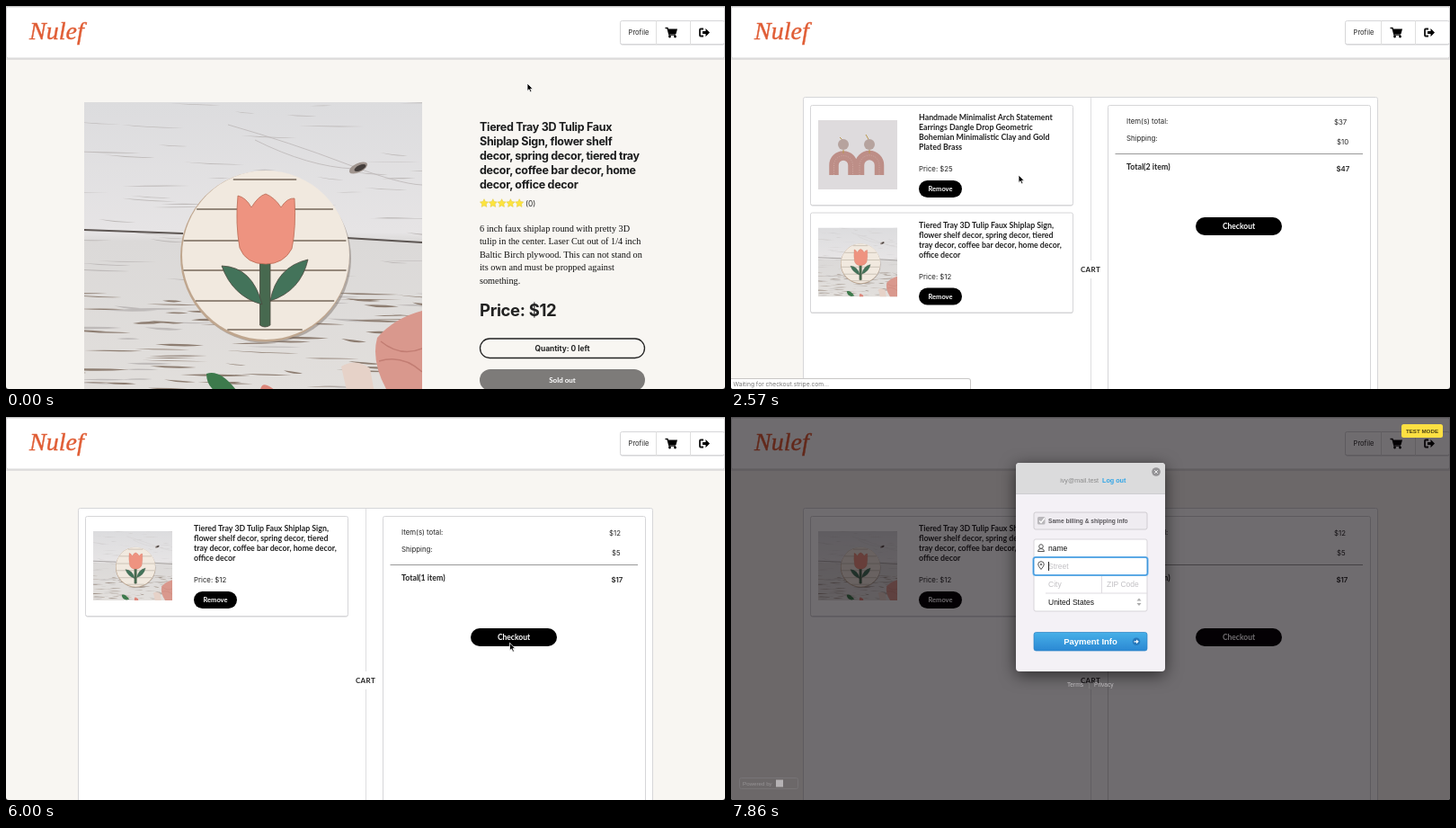
Write an HTML page that moves like this. It is 800 px wide and 426 px high and loops after 8000 ms.

```html
<!DOCTYPE html>
<html lang="en">
<head>
<meta charset="utf-8">
<title>Shop checkout</title>
<style>
html, body { margin: 0; width: 100%; height: 100%; overflow: hidden; background: #222; }
svg { display: block; }
#stage { width: 100%; height: 100%; border-radius: 0 0 3px 3px; }
text { white-space: pre; fill: #222; font: 7.8px Inter, sans-serif; }
.mid { text-anchor: middle; }
.end { text-anchor: end; }
.logo { font: italic 28px "Liberation Serif", serif; fill: #e05d35; stroke: #e05d35; stroke-width: .4px; }
.title { font: 700 12.5px Inter, sans-serif; letter-spacing: -.3px; fill: #1b1c1d; }
.price { font: 700 18.5px Inter, sans-serif; letter-spacing: -.35px; }
.serif { font: 10.25px "Liberation Serif", serif; fill: #111; }
.lato { font: 700 8.8px Lato, sans-serif; }
.pill { font: 700 7.5px Lato, sans-serif; fill: #fff; }
.strong { font-weight: 600; }
.status { font-size: 6.7px; fill: #777; }
.field { font: 8.5px "Liberation Sans", sans-serif; fill: #111; }
.hint { fill: #c3c1c5; }
.small { font: 7.2px "Liberation Sans", sans-serif; fill: #8b8b8b; }
.bold { font-weight: 700; }
.card { fill: #fff; stroke: #d6d6d8; }
</style>
</head>
<body>
<svg id="stage" viewBox="0 0 800 426" preserveAspectRatio="none"></svg>
<script>
const stage = document.getElementById('stage');
const $ = id => document.getElementById(id);

const lines = (x, y, step, cls, rows) =>
  rows.map((row, i) => `<text x="${x}" y="${y + i * step}" class="${cls}">${row}</text>`).join('');

const pill = (x, y, w, h, label, size = 7.5) => `
  <rect x="${x}" y="${y}" width="${w}" height="${h}" rx="${h / 2}"/>
  <text x="${x + w / 2}" y="${y + h / 2 + size * .34}" class="pill mid" style="font-size:${size}px">${label}</text>`;

const card = (x, y, w, h) => `
  <rect x="${x + .5}" y="${y + 1.5}" width="${w}" height="${h}" rx="2" fill="#d4d4d5"/>
  <rect x="${x + .5}" y="${y + .5}" width="${w}" height="${h}" rx="2" class="card"/>`;

function seeded(seed) {
  return () => (seed = (seed * 16807) % 2147483647) / 2147483647;
}

// Thin tapered slivers, dense and brown on the lower planks, sparse and grey above
function woodGrain() {
  const rnd = seeded(41);
  let dark = '', light = '';
  for (let i = 0; i < 150; i++) {
    const low = rnd() < .65;
    const x = rnd() * 400 - 30, y = low ? 210 + rnd() * 112 : rnd() * 205;
    const length = 20 + rnd() * 60, tilt = rnd() * 5 - 1;
    const thick = low ? .6 + rnd() * 2.2 : .5 + rnd() * .7;
    const sliver = `M${x.toFixed()} ${y.toFixed(1)}q${(length / 2).toFixed()} ${(tilt - thick).toFixed(1)} ${length.toFixed()} ${tilt.toFixed(1)}q${(-length / 2).toFixed()} ${thick.toFixed(1)} ${(-length).toFixed()} ${(-tilt).toFixed(1)}z`;
    if (low && rnd() < .7) dark += sliver; else light += sliver;
  }
  return `<path d="${light}" fill="#bebab9"/><path d="${dark}" fill="#8d7d71"/>`;
}

function star(cx, cy, r) {
  const points = Array.from({ length: 10 }, (_, i) => {
    const a = i * Math.PI / 5 - Math.PI / 2, d = i % 2 ? r * .5 : r;
    return `${(cx + d * Math.cos(a)).toFixed(1)},${(cy + d * Math.sin(a)).toFixed(1)}`;
  });
  return `<polygon points="${points.join(' ')}" fill="#fde43c" stroke="#e3cd4c" stroke-width=".6"/>`;
}

const slats = [86, 119, 154, 187, 221, 253].map(y => {
  const half = Math.sqrt(92 * 92 - (y - 171) ** 2);
  return `M${201 - half} ${y}h${2 * half}`;
}).join('');

const tulipPhoto = `
<symbol id="tulip" viewBox="0 0 376 329">
  <rect width="376" height="329" fill="url(#wood)"/>
  ${woodGrain()}
  <g fill="none">
    <path d="M0 142L110 146M292 151L376 156" stroke="#5d5653" stroke-width="1.8"/>
    <path d="M160 25q70 20 130 43t86 24M190 42q60 30 110 32" stroke="#bbb7b6" stroke-width=".8"/>
  </g>
  <ellipse cx="305" cy="73" rx="11" ry="5" fill="#a0958f" transform="rotate(-25 305 73)"/>
  <ellipse cx="307" cy="73" rx="7" ry="3" fill="#443e3c" transform="rotate(-25 307 73)"/>
  <path d="M376 232Q345 240 326 262Q318 292 342 329H376z" fill="#d9988d"/>
  <path d="M330 266q22 18 46 8M328 288q26-8 48 12" fill="none" stroke="#c27d73" stroke-width="1.5"/>
  <path d="M286 294q16-10 32 2l6 33h-30z" fill="#e6d2c8"/>
  <path d="M136 302q16-6 36 22l-14 3q-22-6-22-25z" fill="#3d7a4c"/>
  <path d="M196 329q-2-20 10-13t8 13z" fill="#dc867a"/>
  <ellipse cx="203" cy="174" rx="94" ry="94" fill="#77695f" opacity=".45"/>
  <ellipse cx="201" cy="171.5" rx="94" ry="95" fill="#bfa68e"/>
  <ellipse cx="202" cy="170" rx="93" ry="94" fill="#f1e9df"/>
  <path d="${slats}" stroke="#776859" stroke-width="1.3"/>
  <g stroke="#4c4a3f" stroke-width=".8">
    <path d="M195.5 178h11.500v70q-6 4-11.500 0z" fill="#47694f"/>
    <path d="M153 182Q187 183 198 225Q165 216 153 182z" fill="#43735a"/>
    <path d="M249 175Q214 183 207 221Q241 210 249 175z" fill="#43735a"/>
    <path d="M171 104Q180 106 186 117Q194 104 202 102Q212 106 219 117Q226 106 234 107Q236 140 231 163Q222 180 202 180Q180 180 173 162Q168 135 171 104z" fill="#ee9380" stroke="#b96b55"/>
  </g>
</symbol>`;

const earringPhoto = `
<g>
  <rect x="97" y="127" width="88" height="77" fill="#dedbdd"/>
  <g fill="none" stroke="#bd8e87" stroke-width="10.5">
    <path id="arches" d="M114.5 188V177a10.5 10.5 0 0 1 21 0V188M143 188V177a11 11 0 0 1 22 0V188"/>
    <path d="M114.5 188V177a10.5 10.5 0 0 1 21 0V188M143 188V177a11 11 0 0 1 22 0V188" stroke="#d0aaa3" stroke-width="1" stroke-dasharray="1 1.5"/>
  </g>
  <path d="M121 146l4 4M150 143l4 7M125 160v4M154 160v4" stroke="#b9974b"/>
  <g fill="#b6a39e"><circle cx="125" cy="154" r="6"/><circle cx="154" cy="154" r="6"/></g>
</g>`;

const header = `
  <rect width="800" height="59" y="1" fill="#e3e1e0"/>
  <rect x=".5" y="1" width="799" height="57" rx="2" fill="#fff" stroke="#d6d5d6"/>
  <rect width="800" height="1" fill="#c4c4c4"/>
  <text x="26" y="37" class="logo">Nulef</text>
  ${card(683, 16, 116, 26)}
  <path d="M723.5 16v27M761.5 16v27" stroke="#dedede"/>
  <text x="704" y="32" class="mid" style="font-size:7.5px">Profile</text>
  <path d="M733.5 24.5h2.5l2 7.5h7" fill="none" stroke="#111" stroke-width="1.5"/>
  <path d="M736.5 25.5h10.5l-1.5 5.5h-8z"/><circle cx="738.5" cy="34" r="1.4"/><circle cx="744.5" cy="34" r="1.4"/>
  <path d="M776 25.5h-3q-1 0-1 1v6q0 1 1 1h3" fill="none" stroke="#111" stroke-width="1.8"/>
  <path d="M775 28h3.5v-3l4.5 4.5-4.5 4.5v-3h-3.5z"/>`;

const productPage = `
<g id="product">
  <svg x="87" y="107" width="376" height="329" style="clip-path:inset(0 round 4px)"><use href="#tulip" width="376" height="329"/></svg>
  ${lines(527, 138.5, 16.2, 'title', ['Tiered Tray 3D Tulip Faux', 'Shiplap Sign, flower shelf', 'decor, spring decor, tiered tray', 'decor, coffee bar decor, home', 'decor, office decor'])}
  ${[0, 1, 2, 3, 4].map(i => star(532 + i * 9.8, 219.5, 4.8)).join('')}
  <text x="578" y="222.5" style="font-size:8.3px">(0)</text>
  ${lines(527, 250.5, 14.5, 'serif', ['6 inch faux shiplap round with pretty 3D', 'tulip in the center. Laser Cut out of 1/4 inch', 'Baltic Birch plywood. This can not stand on', 'its own and must be propped against', 'something.'])}
  <text x="527" y="345" class="price">Price: $12</text>
  <rect x="527.5" y="370" width="183" height="21.5" rx="10.7" fill="none" stroke="#222" stroke-width="1.3"/>
  <text x="619" y="383.7" class="mid" style="font-size:8.4px;font-weight:700">Quantity: 0 left</text>
  <g fill="#7d7b79">${pill(527, 404, 184, 24, 'Sold out', 8)}</g>
</g>`;

const cartItem = (photo, price, title) => `
  ${card(88, 110, 292, 111)}${photo}
  ${lines(209, 127, 11, 'lato', title)}
  <text x="209" y="184">Price: $${price}</text>
  ${pill(209, 194, 48, 19, 'Remove')}`;

const cartPage = `
<g id="cart">
  ${card(80, 101, 639, 340)}
  <path d="M400.5 102V283M400.5 303V426" stroke="#dedee0"/>
  <text x="400" y="296" class="lato mid" style="font-size:8px;letter-spacing:.4px">CART</text>
  <g id="earrings">${cartItem(earringPhoto, 25, ['Handmade Minimalist Arch Statement', 'Earrings Dangle Drop Geometric', 'Bohemian Minimalistic Clay and Gold', 'Plated Brass'])}</g>
  <g id="tulipItem">${cartItem('<use href="#tulip" x="97" y="127" width="88" height="77"/>', 12, ['Tiered Tray 3D Tulip Faux Shiplap Sign,', 'flower shelf decor, spring decor, tiered', 'tray decor, coffee bar decor, home decor,', 'office decor'])}</g>
  ${card(419, 110, 292, 330)}
  <text x="440" y="131">Item(s) total:</text><text id="subtotal" x="671" y="131.5"></text>
  <text x="440" y="150">Shipping:</text><text id="shipping" x="674" y="153.5"></text>
  <path d="M427.5 164.5H703" stroke="#999"/>
  <text id="totalLabel" x="440" y="182" class="lato"></text><text id="total" x="673.5" y="183.5" class="strong"></text>
  ${pill(517, 235, 96, 20, 'Checkout', 8.5)}
</g>`;

const statusBar = `
<g id="status">
  <rect x="-3" y="414" width="270" height="16" rx="3" fill="#c9c7c6"/>
  <rect x="-3" y="415" width="269" height="16" rx="2" fill="#fff"/>
  <text id="statusText" x="2.5" y="422.8" class="status"></text>
</g>`;

const checkout = `
<rect id="shade" width="800" height="426" fill="#080308"/>
<g id="dialogLayer">
  <g id="badge">
    <rect x="746" y="8" width="46" height="15" rx="2.5" fill="#fde042"/>
    <text x="769" y="17.8" class="small bold mid" style="font-size:6.2px;fill:#4b4214">TEST MODE</text>
    <rect x="9.5" y="401.5" width="65" height="12" rx="2" fill="none" stroke="#777476"/>
    <text x="13" y="409.5" class="small" style="font-size:6.2px;fill:#969395">Powered by</text>
    <rect x="50" y="403.5" width="8" height="8" fill="#b5b2b4"/>
  </g>
  <g id="dialog">
    <rect x="317" y="51" width="166" height="232" rx="4" fill="#f4f1f6" style="filter:drop-shadow(0 4px 9px #0009)"/>
    <path d="M317 85V55q0-4 4-4H479q4 0 4 4V85z" fill="#dbdbdc"/><path d="M317 85.5H483" stroke="#cdcdd0"/>
    <circle cx="473" cy="61" r="4.8" fill="#949396"/>
    <path d="M471.2 59.2l3.6 3.6m0-3.6l-3.6 3.6" stroke="#eee"/>
    <text x="409" y="72.8" class="small end">ivy@mail.test</text>
    <text x="413" y="72.8" class="small bold" style="fill:#2ea4e6">Log out</text>
    <rect x="337" y="106" width="126" height="19" rx="2" fill="#efecf1" stroke="#cfccd1"/>
    <rect x="341" y="111" width="8.5" height="8.5" rx="1.5" fill="#b9b7bb"/>
    <path d="M343 115.5l2 2 4-5" fill="none" stroke="#fff" stroke-width="1.3"/>
    <text x="353" y="118" class="small bold" style="font-size:6.6px;fill:#59575b">Same billing &amp; shipping info</text>
    <rect x="337" y="136" width="126" height="80" rx="2" fill="#fff" stroke="#d7d4d9"/>
    <path d="M337 156H463M350 176H463M350 196H463M412.5 176V196" stroke="#dedbe0"/>
    <g fill="none" stroke="#555"><circle cx="345" cy="144" r="2.3"/><path d="M341.5 149.5q0-3 3.5-3t3.5 3z"/>
      <path d="M345 169.5q-3.3-4-3.3-5.5a3.3 3.3 0 0 1 6.6 0q0 1.5-3.3 5.5z"/><circle cx="345" cy="164" r=".8"/></g>
    <text id="name" x="353" y="149" class="field"></text>
    <text x="353" y="169" class="field hint">Street</text>
    <text x="353" y="189" class="field hint">City</text>
    <text x="418" y="189" class="field hint">ZIP Code</text>
    <text x="353" y="209" class="field">United States</text>
    <path d="M451.5 204.5l2.5-3 2.5 3zM451.5 207l2.5 3 2.5-3z" fill="#aaa"/>
    <g id="focus" fill="none">
      <rect x="336.5" y="136" width="127" height="20" rx="2.5" stroke="#79bdf0" stroke-width="2.2"/>
      <rect x="336.5" y="136" width="127" height="20" rx="2.5" stroke="#3f95da"/>
    </g>
    <path id="caret" d="M353.5 141v10" stroke="#222"/>
    <rect x="337" y="239.5" width="126" height="20.5" rx="2.5" fill="url(#blue)" stroke="#2c83c4" stroke-width=".7"/>
    <text x="400" y="253" class="field bold mid" style="font-size:9.5px;fill:#fff">Payment Info</text>
    <circle cx="451" cy="249.8" r="4.3" fill="#2679bc"/>
    <path d="M448.5 249.2h2.5v-1.8l2.8 2.4-2.8 2.4v-1.8h-2.5z" fill="#fff"/>
    <text x="374" y="299.7" class="small" style="font-size:6.6px;fill:#bcb9bc">Terms</text>
    <text x="397.5" y="299.7" class="small" style="font-size:6.6px;fill:#888">|</text>
    <text x="404" y="299.7" class="small" style="font-size:6.6px;fill:#bcb9bc">Privacy</text>
  </g>
</g>`;

stage.innerHTML = `
<defs>
  <linearGradient id="wood" x2="0" y2="1"><stop stop-color="#dcdcde"/><stop offset=".44" stop-color="#e6e4e5"/><stop offset=".47" stop-color="#dbd9d8"/><stop offset="1" stop-color="#e2dfdc"/></linearGradient>
  <linearGradient id="blue" x2="0" y2="1"><stop stop-color="#47b0e8"/><stop offset="1" stop-color="#2b88d3"/></linearGradient>
  ${tulipPhoto}
</defs>
<rect width="800" height="426" fill="#f8f6f2"/>
${header}${productPage}${cartPage}${statusBar}${checkout}
<g id="pointer" stroke="#fff" stroke-width=".8">
  <path id="arrow" d="M0 0V8.5L2 6.7 3.5 10 5 9.3 3.6 6.2H6.3z"/>
  <path id="hand" d="M1.5 4.5V.8q1-1.3 2 0v2.4l3.5.7q1 .3.9 1.5L7 9.3H2.5L-.3 5.5q.6-1.4 1.8 0z" fill="#fff" stroke="#111"/>
</g>`;

const FPS = 7, LOOP = 8000;
// Frame, x, y of the pointer tip
const pointerPath = [
  [0, 580, 86], [3, 580, 86], [9, 737, 34], [13, 737, 34], [16, 330, 186], [18, 320, 188],
  [22, 234, 202], [27, 234, 202], [33, 548, 234], [35, 548, 234], [43, 561, 252], [44, 558, 250], [56, 558, 250]
];

function pointerAt(frame) {
  const i = pointerPath.findIndex(p => p[0] > frame);
  const [f0, x0, y0] = pointerPath[i - 1], [f1, x1, y1] = pointerPath[i];
  const u = (frame - f0) / (f1 - f0), e = u * u * (3 - 2 * u);
  return [x0 + (x1 - x0) * e, y0 + (y1 - y0) * e];
}

const show = (id, on) => { $(id).style.display = on ? '' : 'none'; };
const move = (id, transform) => $(id).setAttribute('transform', transform);

function draw(ms) {
  const frame = Math.min(55, Math.floor((ms + 5) * FPS / 1000));
  const inCart = frame >= 14, removed = frame >= 27, open = frame >= 43;

  show('product', !inCart);
  show('cart', inCart);
  show('earrings', !removed);
  move('tulipItem', `translate(0 ${removed ? 0 : 119.5})`);
  $('subtotal').textContent = removed ? '$12' : '$37';
  $('shipping').textContent = removed ? '$5' : '$10';
  $('total').textContent = removed ? '$17' : '$47';
  $('totalLabel').textContent = removed ? 'Total(1 item)' : 'Total(2 item)';

  show('status', frame >= 9 && frame < 21);
  $('statusText').textContent = inCart ? 'Waiting for checkout.stripe.com…' : 'localhost:3000/cart';

  const entering = frame === 43;
  show('shade', open);
  show('dialogLayer', open);
  $('shade').style.opacity = entering ? .38 : .58;
  $('badge').style.opacity = entering ? .8 : 1;
  $('dialog').style.opacity = entering ? .72 : 1;
  move('dialog', entering ? 'translate(400 176) scale(.985) translate(-400 -167)' : `translate(0 ${frame === 44 ? -2 : 0})`);

  const typed = 'name'.slice(0, Math.max(0, frame - 48)), onStreet = frame >= 54;
  const name = $('name');
  name.textContent = typed || 'Name';
  name.classList.toggle('hint', !typed);
  move('focus', `translate(0 ${onStreet ? 20 : 0})`);
  const caretX = typed && !onStreet ? name.getComputedTextLength() + .5 : 0;
  move('caret', `translate(${caretX} ${onStreet ? 20 : 0})`);

  const hovering = frame >= 9 && frame <= 13;
  show('pointer', frame < 49);
  show('arrow', !hovering);
  show('hand', hovering);
  move('pointer', `translate(${pointerAt(frame)})`);
}

const start = performance.now();
function tick() {
  draw((performance.now() - start) % LOOP);
  requestAnimationFrame(tick);
}
tick();
</script>
</body>
</html>
```
